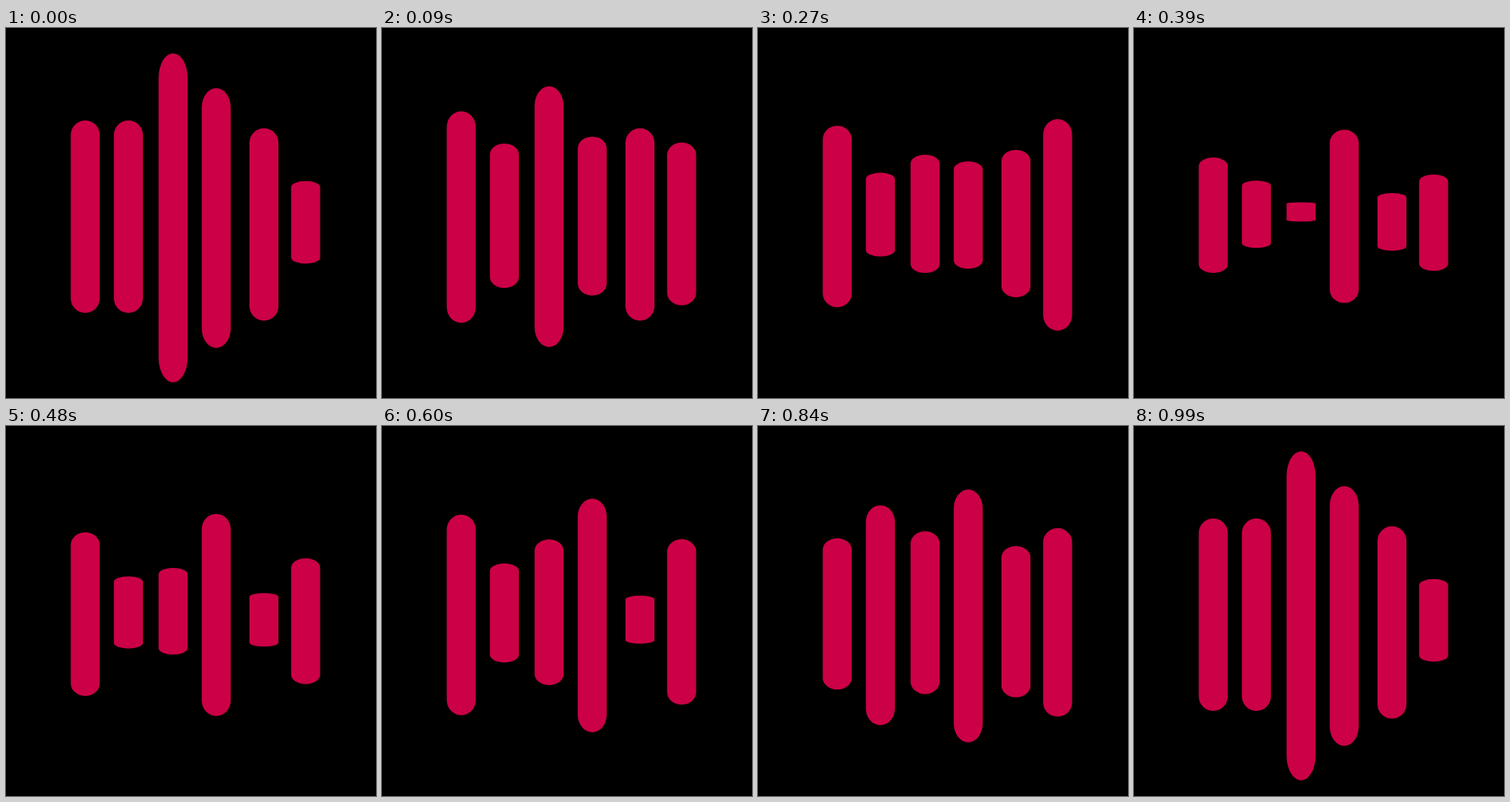
Write an HTML page with a canvas that moves like this. It is 500 by 500 pixels and loops after 1020 ms.

```html
<!DOCTYPE html>
<html lang="en">
<head>
<meta charset="utf-8">
<title>Equalizer bars</title>
<style>
html, body { margin: 0; width: 100%; height: 100%; overflow: hidden; background: #000; }
canvas { display: block; width: 100vw; height: 100vh; }
</style>
</head>
<body>
<canvas id="stage" width="500" height="500"></canvas>
<script>
const ctx = document.getElementById('stage').getContext('2d');
const STEP = 30, LAST = 33, BEATS = 5;
const WIDTH = 39.2, TOP = -125, HEIGHT = 260;

// Each bar glides through its levels (percent of HEIGHT), one per beat.
const bar = (x, y, lag, ...levels) => ({ x, y, lag, levels });
const bars = [
  bar(87.5, 250, 0, 100, 120, 60, 110, 70),
  bar(145.8, 250, 0, 100, 50, 35, 40, 120),
  bar(206.2, 248, 0, 171, 100, 10, 80, 50),
  bar(264.5, 250, 0, 135, 30, 90, 120, 130),
  bar(329, 260.5, 0.4, 100, 100, 30, 25, 70),
  bar(385.3, 260.5, 0.4, 43, 140, 50, 86, 120)
];

// Beats are evenly spaced and land on whole steps.
const beatStep = (i, lag) => Math.floor(i * LAST / BEATS + lag);

function levelAt({ levels, lag }, step) {
  let i = 0;
  while (i < BEATS - 1 && step >= beatStep(i + 1, lag)) i++;
  const from = beatStep(i, lag), to = beatStep(i + 1, lag);
  const a = levels[i], b = levels[(i + 1) % BEATS];
  return a + (b - a) * (step - from) / (to - from);
}

function draw(time) {
  const step = Math.floor(time / STEP) % (LAST + 1);
  ctx.fillStyle = '#000';
  ctx.fillRect(0, 0, 500, 500);
  ctx.fillStyle = '#cb0047';
  for (const b of bars) {
    ctx.save();
    ctx.translate(b.x, b.y);
    ctx.scale(1, levelAt(b, step) / 100);
    ctx.beginPath();
    ctx.roundRect(0, TOP, WIDTH, HEIGHT, WIDTH / 2);
    ctx.fill();
    ctx.restore();
  }
}

const start = performance.now();
function loop() {
  draw(performance.now() - start);
  requestAnimationFrame(loop);
}
loop();
</script>
</body>
</html>
```
